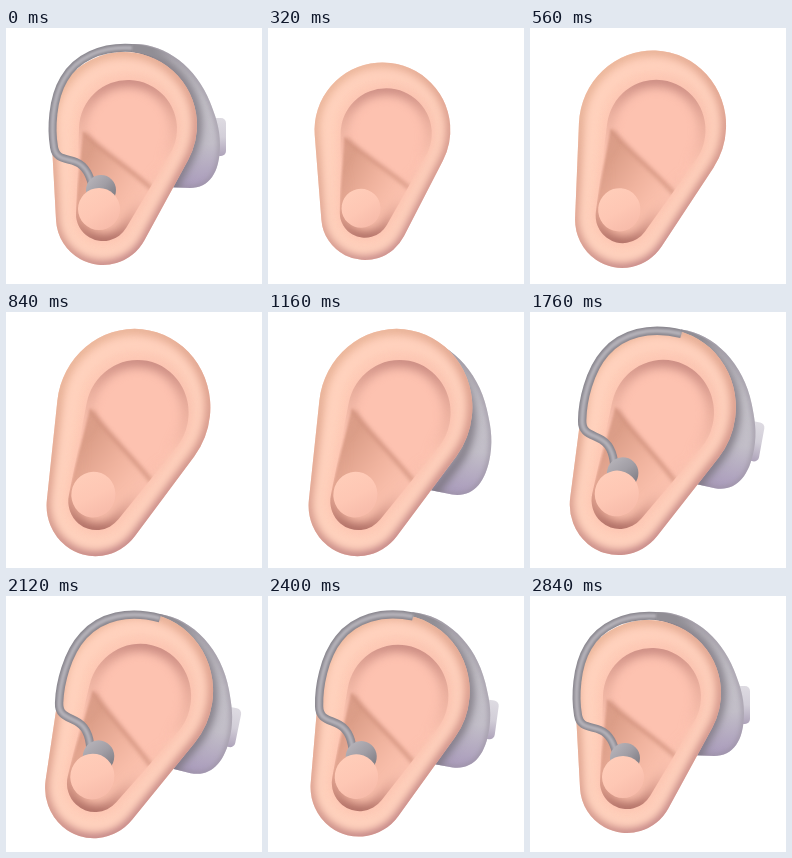
Recreate the animation shown at these times as an HTML page with a canvas. Size 256 by 256 pixels, loop 2.88 s.

```html
<!DOCTYPE html>
<html lang="en">
<head>
<meta charset="utf-8">
<title>Ear with hearing aid</title>
<style>
html, body { margin: 0; width: 100%; height: 100%; overflow: hidden; background: #fff; }
canvas { display: block; width: 256px; height: 256px; }
</style>
</head>
<body>
<canvas id="stage" width="256" height="256"></canvas>
<script>
const ctx = document.getElementById('stage').getContext('2d');
const LOOP = 2880, STEP = 40;

// The pose is a blend of a few eased phases.
function poseAt(t) {
  const ramp = (from, to) => {
    const p = Math.min(1, Math.max(0, (t - from) / (to - from)));
    return p * p * (3 - 2 * p);
  };
  const shrink = ramp(80, 320) - ramp(320, 720);
  const lean = ramp(320, 720) - ramp(2160, 2800);
  const settle = ramp(1480, 2000) - ramp(2160, 2800);
  const drop = ramp(920, 1160) - ramp(1160, 1360);
  const lift = ramp(1160, 1360) - ramp(1360, 1760);
  return {
    x: 97 - 7 * lean - 1.5 * settle,
    y: 190 - 1.5 * shrink + 3 * lean - 2 * settle,
    tilt: -1.4 * shrink + 9 * lean + 2.5 * settle,
    scaleX: 1 - .07 * shrink + .05 * lean,
    scaleY: 1 - .075 * shrink + .09 * lean,
    aid: 1 - .5 * ramp(80, 480) + .5 * ramp(920, 1160),
    aidX: 11 * lift,
    aidY: 7 * drop - 7 * lift,
    aidSquash: 1 - .045 * lean,
    tube: 1 - ramp(80, 260) + ramp(1180, 1420),
    plug: 1 - ramp(60, 180) + ramp(1500, 1760)
  };
}

// Outline of two circles joined by their outer tangents.
function hull(x1, y1, r1, x2, y2, r2) {
  const axis = Math.atan2(y2 - y1, x2 - x1);
  const spread = Math.acos((r1 - r2) / Math.hypot(x2 - x1, y2 - y1));
  const path = new Path2D();
  path.arc(x1, y1, r1, axis + spread, axis - spread + 2 * Math.PI);
  path.arc(x2, y2, r2, axis - spread, axis + spread);
  path.closePath();
  return path;
}

function disc(x, y, r) {
  const path = new Path2D();
  path.arc(x, y, r, 0, 2 * Math.PI);
  return path;
}

function gradient(x1, y1, x2, y2, ...colors) {
  const g = ctx.createLinearGradient(x1, y1, x2, y2);
  colors.forEach((color, i) => g.addColorStop(i / (colors.length - 1), color));
  return g;
}

function fill(path, style, blur = 0) {
  ctx.filter = blur ? `blur(${blur}px)` : 'none';
  ctx.fillStyle = style;
  ctx.fill(path);
  ctx.filter = 'none';
}

function stroke(path, style, width, blur = 0) {
  ctx.filter = blur ? `blur(${blur}px)` : 'none';
  ctx.strokeStyle = style;
  ctx.lineWidth = width;
  ctx.stroke(path);
  ctx.filter = 'none';
}

function clipped(path, draw) {
  ctx.save();
  ctx.clip(path);
  draw();
  ctx.restore();
}

const outline = hull(118, 97, 73, 97, 190, 47);
const ridge = hull(119, 98, 60, 97, 188, 37);
const hollow = hull(122, 101, 49, 97, 186, 27);
const concha = new Path2D('M77 103 C92 120 125 141 150 162 L124 202 Q96 224 68 198 Z');
const fold = new Path2D('M79 105 C94 121 124 141 146 161');
const tragus = disc(93, 181, 21);

const aidBody = new Path2D('M125 16 C157 14 190 38 204 74 C209 87 214 99 214 117 C214 145 203 160 184 160 L160 159 C180 100 165 27 125 24 Z');
const aidJoint = new Path2D('M126 20 Q146 21 166 33');
const tubeLine = new Path2D('M126 20 C95 18 70 30 58 51 C46 71 45 101 48 119 C50 132 60 130 70 134 C80 138 84 148 87 160');
const TUBE_LENGTH = 222;

function withAid(pose, draw) {
  ctx.save();
  ctx.translate(118 + pose.aidX, 100 + pose.aidY);
  ctx.scale(pose.aid, pose.aid);
  ctx.translate(-118, 60);
  ctx.scale(1, pose.aidSquash);
  ctx.translate(0, -160);
  draw();
  ctx.restore();
}

function drawAidBody(pose) {
  const button = new Path2D();
  button.roundRect(191 + 14 * pose.tube, 90, 15, 38, 5);
  fill(button, gradient(0, 90, 0, 128, '#dedbe2', '#d2ced8', '#aea3ba'));
  fill(aidBody, gradient(180, 30, 190, 160, '#b5b2b8', '#c3c0c7', '#c2bec8', '#a99abb'));
  clipped(aidBody, () => {
    stroke(aidBody, '#98909f99', 5, 2);
    stroke(outline, '#77717b', 8, 4);
  });
  if (pose.tube > 0) stroke(aidJoint, gradient(126, 0, 166, 0, '#918e95', '#918e95', '#918e9500'), 8);
}

function drawEar() {
  fill(outline, gradient(45, 0, 190, 0, '#ffcfb9', '#fecbb7', '#f9c2ae'));
  clipped(outline, () => {
    stroke(outline, gradient(55, 60, 165, 200, '#e9b498', '#dca08d', '#bf8284'), 12, 5);
    stroke(ridge, '#ffd3bf', 9, 5);
    fill(hollow, '#fdc2b0', 4);
    clipped(hollow, () => {
      fill(concha, gradient(75, 140, 135, 175, '#dc9e88', '#f0b39e', '#fec5b2'), 1);
      stroke(fold, '#cf8f7b', 3, 2);
      stroke(hollow, gradient(0, 52, 0, 213, '#c98a81', '#d99b8b88', '#d99b8b00', '#d99b8b22', '#a9685f'), 14, 5);
    });
  });
}

function drawTube(pose) {
  if (pose.tube <= 0) return;
  ctx.setLineDash([TUBE_LENGTH * pose.tube, 500]);
  stroke(tubeLine, '#8b8890', 8);
  stroke(tubeLine, '#b4b1b8', 4, .9);
  ctx.setLineDash([]);
}

function drawPlug(pose) {
  if (pose.plug <= 0) return;
  const y = 162 + 14 * (1 - pose.plug);
  fill(disc(95, y, 15), gradient(82, 148, 108, 172, '#b9b6bc', '#a19ea5', '#7c7980'));
}

function drawTragus() {
  fill(tragus, gradient(80, 162, 107, 202, '#ffcdb9', '#fec7b4', '#f6b9a8'), .7);
}

function render(t) {
  const pose = poseAt(t);
  ctx.clearRect(0, 0, 256, 256);
  ctx.save();
  ctx.translate(pose.x, pose.y);
  ctx.rotate(pose.tilt * Math.PI / 180);
  ctx.scale(pose.scaleX, pose.scaleY);
  ctx.translate(-97, -190);
  if (pose.aid > .55) withAid(pose, () => drawAidBody(pose));
  drawEar();
  withAid(pose, () => drawTube(pose));
  drawPlug(pose);
  drawTragus();
  ctx.restore();
}

const start = performance.now();
function tick() {
  const elapsed = (performance.now() - start) % LOOP;
  render(Math.floor(elapsed / STEP) * STEP);
  requestAnimationFrame(tick);
}
tick();
</script>
</body>
</html>
```
